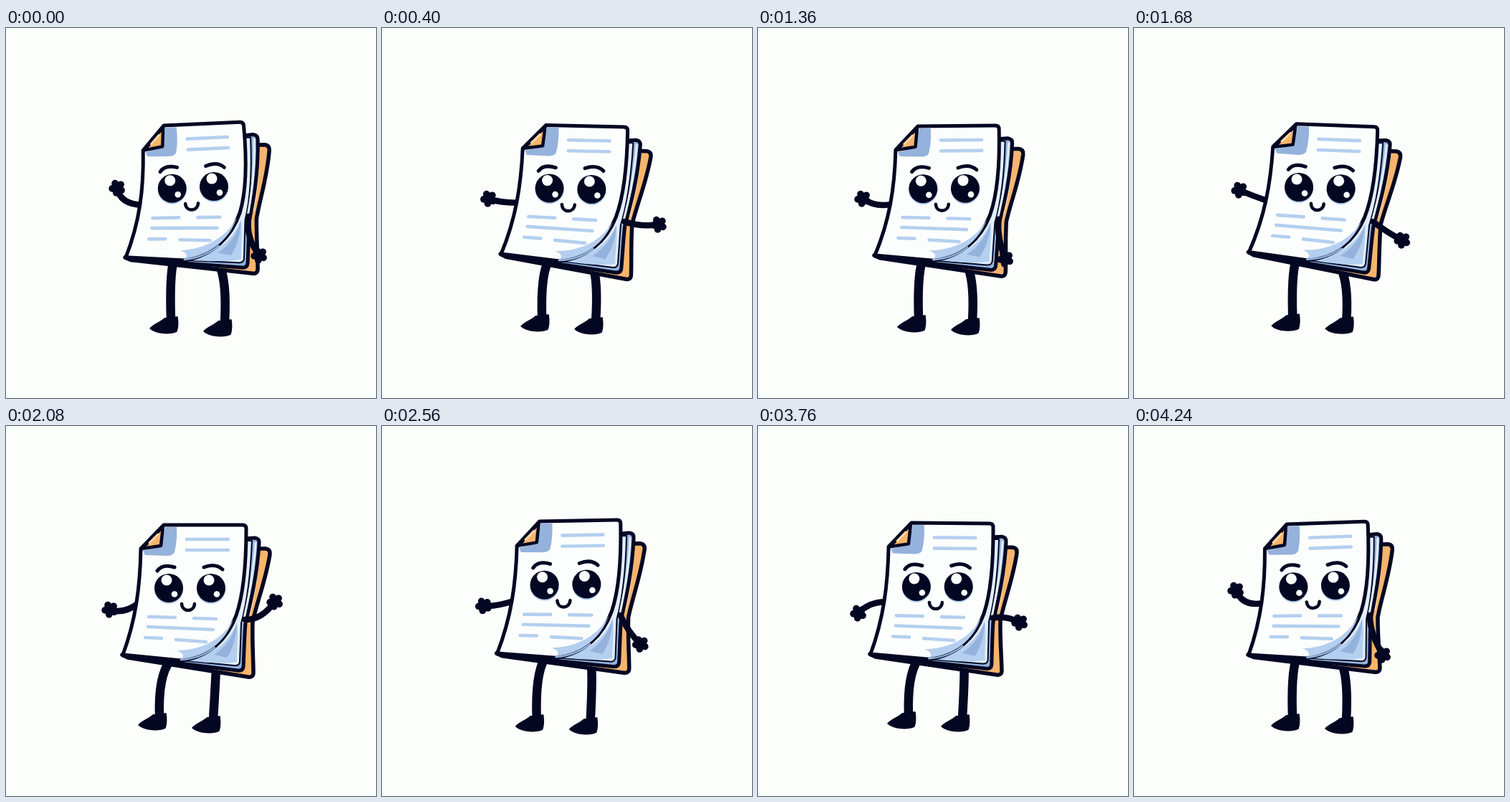
Recreate the animation shown at these times as an HTML page with a canvas. Size 516 by 516 pixels, loop 4320 ms.

```html
<!DOCTYPE html>
<html lang="en">
<head>
<meta charset="utf-8">
<title>Dancing paper stack</title>
<style>
html, body { margin: 0; width: 100%; height: 100%; overflow: hidden; background: #fcfefc; }
canvas { display: block; width: 516px; height: 516px; }
</style>
</head>
<body>
<canvas id="stage" width="516" height="516"></canvas>
<script>
const ctx = document.getElementById('stage').getContext('2d');
const STEP = 80, STEPS = 54, CYCLE = 18;
const INK = '#030722', WHITE = '#fcfefd', PALE = '#e2eefb', SKY = '#b4cfef',
      BLUE = '#94b2dc', ORANGE = '#f8b46c', CREAM = '#fcd9a8';

// The whole figure slides slowly to the left through the loop.
const drift = n => 6 - 14 * n / 53;

// home step, then top-left, top-right, bottom-left, bottom-right, bend, left toe
const BODY = {
  lean:   [0, 220,136, 330,131, 164,321, 351,342, 13, 201,419],
  tip:    [38, 223,133, 335,138, 152,312, 335,351, 6, 189,415],
  open:   [26, 220,138, 334,138, 160,320, 345,350, 0, 185,417],
  high:   [10, 225,138, 340,140, 160,319, 347,351, 0, 186,417],
  drop:   [47, 214,135, 327,136, 154,319, 340,347, 0, 181,415],
  rise:   [27, 221,133, 333,131, 159,318, 346,344, 4, 188,419],
  back:   [17, 223,137, 335,136, 160,318, 345,346, 8, 195,417],
  finish: [53, 213,137, 325,133, 157,320, 343,343, 3, 192,418]
};
// home step, then left elbow, left hand, right elbow, right hand
const ARMS = {
  lean:   [0, 159,246, 155,223, 334,292, 353,317],
  tip:    [38, 160,228, 144,220, 349,291, 366,307],
  out:    [23, 160,244, 144,238, 358,278, 381,274],
  open:   [26, 164,263, 145,256, 356,271, 375,245],
  high:   [10, 165,260, 143,250, 356,268, 371,239],
  drop:   [47, 155,245, 140,261, 347,264, 365,274],
  low:    [30, 158,254, 142,258, 352,280, 375,289],
  tuck:   [27, 158,252, 143,247, 340,291, 355,312],
  back:   [17, 165,251, 146,238, 333,293, 345,322],
  finish: [53, 152,253, 142,229, 329,290, 347,319]
};
const BODY_BEATS = { 0: 'lean', 2: 'tip', 8: 'open', 10: 'high', 11: 'drop', 14: 'rise', 17: 'back' };
const ARM_BEATS = { 0: 'lean', 2: 'tip', 5: 'out', 8: 'open', 10: 'high', 11: 'drop',
                    12: 'low', 15: 'tuck', 17: 'back' };

function makeTrack(poses, beats, isX) {
  const keys = [];
  for (let c = 0; c < 3; c++) {
    for (const [beat, name] of Object.entries(beats)) {
      const at = c * CYCLE + +beat;
      const [home, ...v] = poses[at === STEPS - 1 ? 'finish' : name];
      keys.push({ at, v: v.map((n, i) => isX(i) ? n - drift(home) : n) });
    }
  }
  return n => {
    const i = Math.max(1, keys.findIndex(k => k.at >= n));
    const a = keys[i - 1], b = keys[i], f = (n - a.at) / (b.at - a.at);
    return a.v.map((p, j) => p + (b.v[j] - p) * f + (isX(j) ? drift(n) : 0));
  };
}
const bodyAt = makeTrack(BODY, BODY_BEATS, i => i < 8 ? i % 2 === 0 : i === 9);
const armsAt = makeTrack(ARMS, ARM_BEATS, i => i % 2 === 0);

// Maps resting coordinates onto the bent, tilted stack.
function makeWarp([ax, ay, bx, by, cx, cy, dx, dy, bend]) {
  const local = (x, y) => {
    const t = (y - 138) / 182;
    return [(x - 220 + 60 * t) / 114, t];
  };
  const plain = (s, t) => [
    ax + s * (bx - ax) + t * (cx - ax) + t * (1 - t) * bend,
    ay + s * (by - ay) + t * (cy - ay)
  ];
  const [s0, t0] = local(345, 350), [px, py] = plain(s0, t0);
  const wx = (dx - px) / (s0 * t0), wy = (dy - py) / (s0 * t0);
  return (x, y) => {
    const [s, t] = local(x, y), [qx, qy] = plain(s, t);
    return [qx + s * t * wx, qy + s * t * wy];
  };
}

function paint(path, fill, line, width) {
  const p = new Path2D(path);
  if (fill) { ctx.fillStyle = fill; ctx.fill(p); }
  if (line) { ctx.strokeStyle = line; ctx.lineWidth = width; ctx.stroke(p); }
}
function dot(x, y, r, fill) {
  ctx.fillStyle = fill;
  ctx.beginPath();
  ctx.arc(x, y, r, 0, 7);
  ctx.fill();
}
function fist(x, y) {
  dot(x, y, 8.5, INK);
  for (let i = 0; i < 5; i++) dot(x + 7 * Math.cos(i * 1.257 + .5), y + 7 * Math.sin(i * 1.257 + .5), 4.8, INK);
}
function arm([sx, sy], ex, ey, hx, hy) {
  paint(`M${sx},${sy} Q${ex},${ey} ${hx},${hy}`, null, INK, 8.5);
  fist(hx, hy);
}
function leg([hx, hy], tx, ty, lean) {
  const ax = tx + 29, ay = ty - 12;
  paint(`M${hx},${hy} Q${ax + lean},${hy + 22} ${ax},${ay}`, null, INK, 12.5);
  ctx.save();
  ctx.translate(tx, ty);
  paint('M0,0 C5,-6 14,-8 20,-14 L38,-16 C39,-9 39,-2 37,4 C29,8 9,8 0,0Z', INK, INK, 1.5);
  ctx.restore();
}

function drawStack(shape, warp, rightArm) {
  shape('M162,319 L346,177 L348,171 L362,171 Q369,172 368,179 C362,216 350,245 344,273 ' +
        'C343,300 345,325 345,344 Q345,351 338,350 L170,323Z', ORANGE, INK, 5.5);
  shape('M353,177 C350,215 345,242 340,262', null, CREAM, 2.5);
  shape('M163,320 L333,157 L347,156 Q354,157 353,164 C350,212 340,250 334,275 ' +
        'C332,300 332,320 331,336 Q330,342 323,341 L170,322Z', BLUE, INK, 5);
  shape('M333,160 L343,160 C341,210 335,250 328,275 L326,329 Q325,335 318,334 L245,327Z', PALE, INK, 2);
  shape('M348,163 C345,212 336,250 331,273', null, PALE, 3);
  shape('M244,325 C285,324 312,302 322,274 C325,296 321,316 322,329 Q300,333 250,327Z', SKY);
  shape('M290,319 C306,309 317,292 322,275 C322,295 315,313 308,323Z', BLUE);
  rightArm();

  // front sheet
  shape('M220,138 L330,138 Q335,138 335,143 C335,196 330,238 321,264 C309,297 284,322 244,327 ' +
        'L163,319 C181,270 187,225 188,171Z', WHITE, INK, 5);
  shape('M238,313 C272,313 302,298 317,270 C306,300 282,321 244,325 Q252,319 238,313Z', SKY);
  shape('M244,326 C262,325 278,319 291,309', null, BLUE, 2.5);
  shape('M222,141 L238,141 Q239,160 235,176 Q233,181 224,181 L194,180 L191,174 L216,168Z', BLUE);
  shape('M219,140 L216,167 L190,171Z', ORANGE, INK, 4.5);
  shape('M212,151 L200,163', null, CREAM, 3);
  shape('M252,158 L310,158 M252,173 L310,173 M199,266 L236,267 M262,268 L293,269 ' +
        'M198,280 L289,284 M194,295 L217,296 M237,298 L279,301', null, SKY, 4.6);

  // face
  for (const x of [227, 286]) {
    const [ex, ey] = warp(x, 226);
    dot(ex, ey + 2, 20, SKY);
    dot(ex, ey, 20, INK);
    dot(ex - 3, ey - 11, 7.5, WHITE);
    dot(ex + 8, ey + 8.5, 4.3, WHITE);
  }
  shape('M211,202 Q218,192 235,197 M276,197 Q292,191 302,200', null, INK, 5);
  shape('M245,248 C246,260 262,260 263,248', null, INK, 4.5);
}

function draw(n) {
  const body = bodyAt(n), arms = armsAt(n), warp = makeWarp(body);
  const [toeX, toeY] = body.slice(9);
  const shape = (path, ...style) => paint(
    path.replace(/([\d.]+),([\d.]+)/g, (_, x, y) => warp(+x, +y).map(v => v.toFixed(2)).join()), ...style);

  ctx.fillStyle = '#fcfefc';
  ctx.fillRect(0, 0, 516, 516);
  ctx.lineCap = ctx.lineJoin = 'round';
  leg(warp(229, 327), toeX, toeY, -2);
  leg(warp(293, 338), toeX + 75, toeY + 4, 3);
  arm(warp(185, 247), ...arms.slice(0, 4));
  drawStack(shape, warp, () => arm(warp(333, 270), ...arms.slice(4)));
}

const start = performance.now();
let shown = -1;
function tick() {
  const n = Math.floor((performance.now() - start) / STEP) % STEPS;
  if (n !== shown) draw(shown = n);
  requestAnimationFrame(tick);
}
tick();
</script>
</body>
</html>
```
